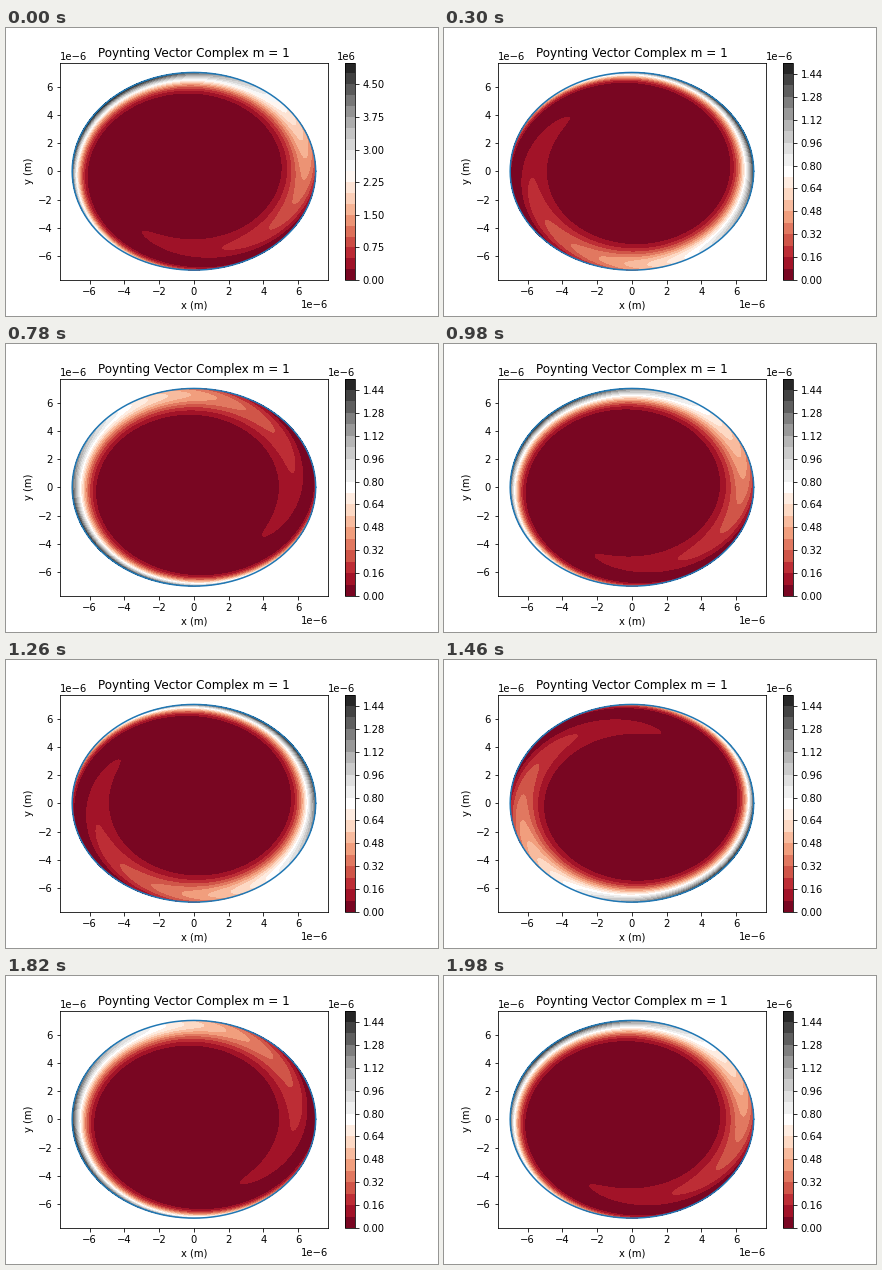
These frames come from a looping animation (432 by 288 pixels, 2000 ms). A matplotlib script:

```python
import numpy as np
import matplotlib.pyplot as plt
from matplotlib.animation import FuncAnimation
from matplotlib.transforms import Affine2D

FRAMES = 100
TURNS = 2
R = 7e-6             # wire radius
DECAY = 1.39e6       # amplitude loss per metre of depth
TWIST = 1.8e6        # phase lag per metre of depth
PEAK_ANGLE = np.radians(138)

fig = plt.figure(figsize=(6, 4), dpi=72, facecolor="white")
ax = fig.add_axes([0.125, 0.125, 0.62, 0.755])

# Power density: decays inwards from the rim and lags with depth
theta = np.linspace(0, 2 * np.pi, 241)
r, phi = np.meshgrid(np.linspace(0, R, 141), theta)
depth = R - r
power = np.exp(-DECAY * depth) * np.cos((phi - PEAK_ANGLE + TWIST * depth) / 2) ** 2
x, y = r * np.cos(phi), r * np.sin(phi)


def make_view(peak, step, bands, tick_every):
    """Filled contours with their own colorbar."""
    levels = step * np.arange(bands + 1)
    contours = ax.contourf(x, y, peak * power, levels=levels, cmap="RdGy")
    cax = fig.add_axes([0.78375, 0.125, 0.755 * 4 / 20 / 6, 0.755])
    fig.colorbar(contours, cax=cax, ticks=levels[::tick_every])
    return contours, cax


views = [
    make_view(4.98e6, 0.25e6, 20, 3),
    make_view(1.446e-6, 0.08e-6, 19, 2),
]

ax.plot(R * np.cos(theta), R * np.sin(theta), color="C0", lw=1.5)
ax.set_xlim(-1.1 * R, 1.1 * R)
ax.set_ylim(-1.1 * R, 1.1 * R)
ax.set_title("Poynting Vector Complex m = 1", y=1.0)
ax.set_xlabel("x (m)")
ax.set_ylabel("y (m)")


def update(i):
    # The scale is reset once, right after the opening frame
    active = min(i, 1)
    for n, (contours, cax) in enumerate(views):
        contours.set_visible(n == active)
        cax.set_visible(n == active)
    turn = -2 * np.pi * TURNS * i / (FRAMES - 1)
    views[active][0].set_transform(Affine2D().rotate(turn) + ax.transData)
    return []


anim = FuncAnimation(fig, update, frames=FRAMES, interval=20, repeat=True,
                     repeat_delay=0, blit=False)
plt.show()
```
